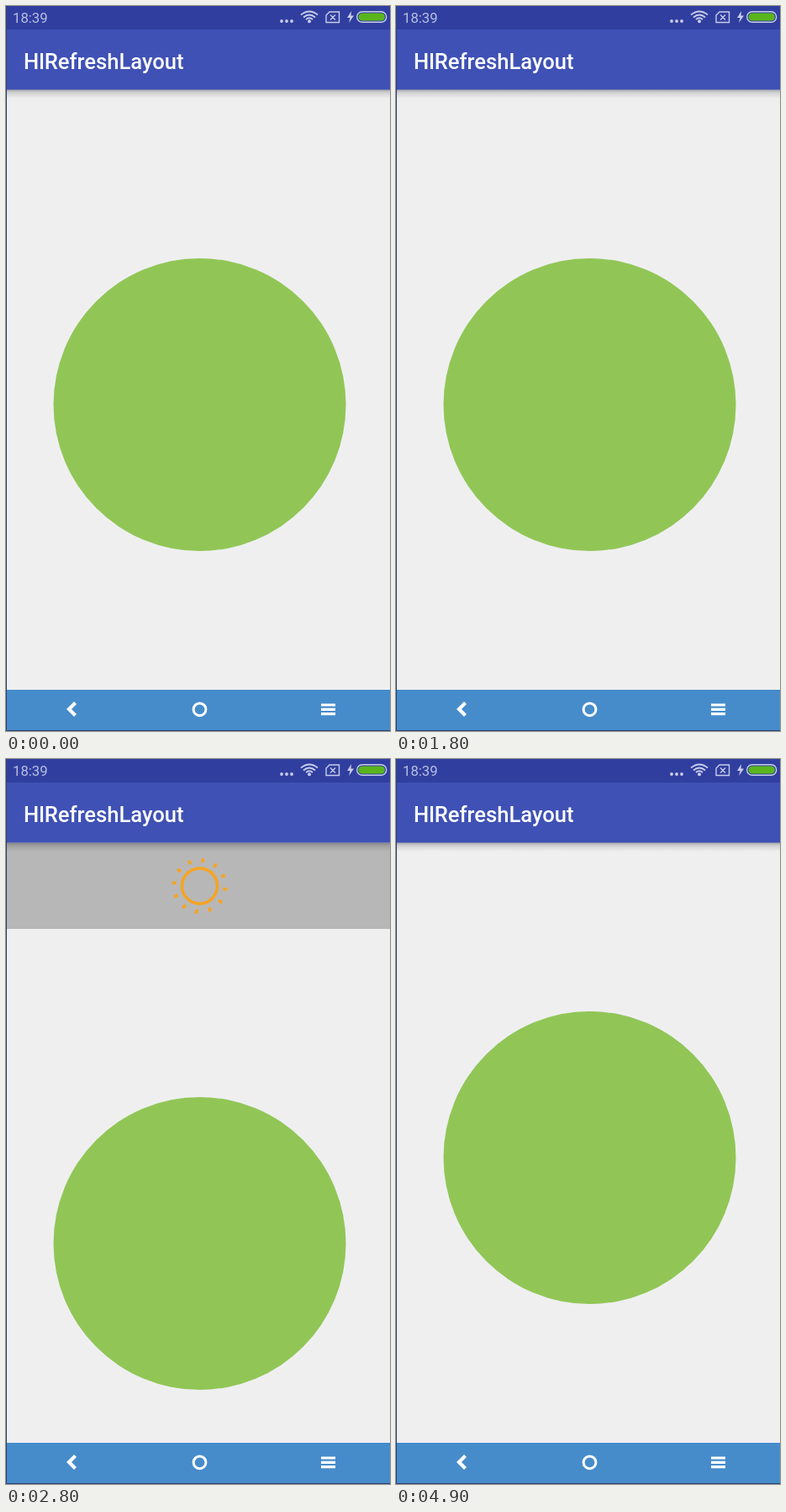
An HTML page for the animation above (5 s loop, 457 by 862 pixels).

```html
<!DOCTYPE html>
<html lang="en">
<head>
<meta charset="utf-8">
<title>Pull to refresh</title>
<style>
  html, body { margin: 0; width: 100%; height: 100%; overflow: hidden; background: #efeff0; }
  svg { display: block; width: 100%; height: 100%; }
  text { font-family: Roboto, sans-serif; }
</style>
</head>
<body>
<svg viewBox="0 0 457 862" preserveAspectRatio="none">
  <defs>
    <linearGradient id="shade" x2="0" y2="1">
      <stop offset="0" stop-color="#000" stop-opacity=".3"/>
      <stop offset=".4" stop-color="#000" stop-opacity=".12"/>
      <stop offset="1" stop-color="#000" stop-opacity="0"/>
    </linearGradient>
    <clipPath id="headerClip"><rect id="clipBox" y="100" width="457" height="0"/></clipPath>
  </defs>

  <rect width="457" height="862" fill="#efeff0"/>
  <circle id="badge" cx="230.5" cy="474" r="174" fill="#91c656"/>

  <g clip-path="url(#headerClip)">
    <rect y="100" width="457" height="300" fill="#b8b7b7"/>
    <g id="sun" fill="none" stroke="#f4a524">
      <circle r="21" stroke-width="3.6"/>
      <circle r="30.5" stroke-width="5" pathLength="360" stroke-dasharray="7 23" stroke-dashoffset="3.5"/>
    </g>
  </g>
  <rect y="99" width="457" height="11" fill="url(#shade)"/>

  <rect width="457" height="28" fill="#303f9f"/>
  <rect y="28" width="457" height="71.5" fill="#3f51b5"/>
  <text x="8" y="20" font-size="16.7" fill="#b9bfe2">18:39</text>
  <text x="21" y="75" font-size="25.6" font-weight="500" fill="#fff">HlRefreshLayout</text>

  <g fill="#c8cde9">
    <circle cx="328" cy="18" r="1.9"/>
    <circle cx="334" cy="18" r="1.9"/>
    <circle cx="340" cy="18" r="1.9"/>
    <circle cx="361" cy="18.3" r="2"/>
    <path d="M411 6L406 14H409.500L408 20L414 11.500H410.500Z"/>
  </g>
  <g fill="none" stroke="#c8cde9" stroke-width="1.8">
    <path d="M351 10.500Q361 2.500 371 10.500M354 13.500Q361 7.500 368 13.500M357 16Q361 12.500 365 16"/>
    <path d="M385 7H396.500V19.500H381V11ZM386 10.500L392 16.500M392 10.500L386 16.500" stroke-width="1.4"/>
    <rect x="417.700" y="6.700" width="35" height="12.600" rx="6.300" stroke-width="1.4"/>
  </g>
  <rect x="419.500" y="8.500" width="31.400" height="9" rx="4.500" fill="#5ab51c"/>

  <rect y="813" width="457" height="49" fill="#468ccb"/>
  <g fill="none" stroke="#fff">
    <path d="M82.500 828.500L75 836L82.500 843.500" stroke-width="4.200"/>
    <circle cx="230.500" cy="836.300" r="7.400" stroke-width="3"/>
    <path d="M375 831H392M375 836.300H392M375 841.600H392" stroke-width="3.200"/>
  </g>
  <path d="M.5 0V861.500H457" fill="none" stroke="#2c406f"/>
</svg>
<script>
  const $ = id => document.getElementById(id);
  const LOOP = 5000, STEP = 100, HOLD = 102;

  // Each gesture: start time, then the pull distance at every step.
  const gestures = [
    [600, [4, 16, 32, 48, 59, 64, 64, 64, 46, 24, 9, 2, 0]],
    [1900, [30, 85, 140, 172, 143, 120, 108, 103, HOLD]],
    [4300, [96, 74, 44, 20, 6, 0]]
  ];

  function pullAt(t) {
    const [start, steps] = gestures.findLast(g => t >= g[0]) || [0, [0]];
    return steps[Math.min((t - start) / STEP, steps.length - 1)];
  }

  function draw(now) {
    const t = Math.floor(now % LOOP / STEP) * STEP;
    const pull = pullAt(t);
    const angle = t < 2600 ? pull * 1.36 : 7 + (t - 2800) * .351;
    $('badge').setAttribute('transform', `translate(0 ${pull})`);
    $('clipBox').setAttribute('height', pull);
    $('sun').setAttribute('transform', `translate(230.5 ${100 + pull / 2}) rotate(${angle})`);
    requestAnimationFrame(draw);
  }
  draw(performance.now());
</script>
</body>
</html>
```
